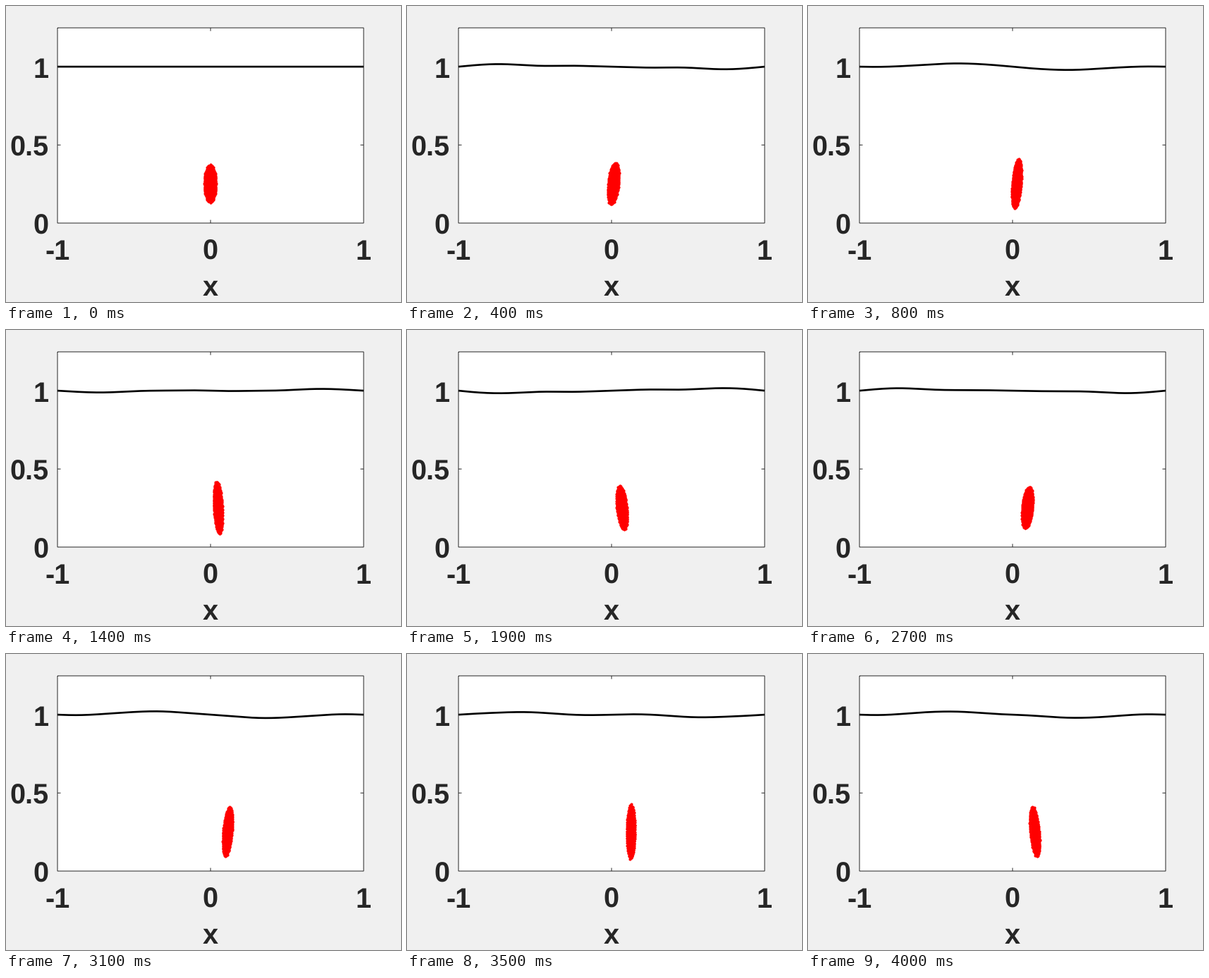
A matplotlib script for the animation above (4100 ms loop, 560 by 420 pixels).

```python
import numpy as np
import matplotlib.pyplot as plt
from matplotlib.animation import FuncAnimation

W, H, DPI = 560, 420, 100
FRAMES, INTERVAL = 41, 100
PX = 72 / DPI                    # points per pixel
LEFT, RIGHT, TOP, BOTTOM = 73, 507, 31, 308
MID = (LEFT + RIGHT) / 2
INK = "#262626"
plt.rcParams["text.hinting"] = "none"


def to_x(x):
    return MID + x * (RIGHT - LEFT) / 2


def to_y(y):
    return BOTTOM - y * (BOTTOM - TOP) / 1.25


fig = plt.figure(figsize=(W / DPI, H / DPI), dpi=DPI, facecolor="#f0f0f0")
ax = fig.add_axes([0, 0, 1, 1])
ax.set_xlim(0, W)
ax.set_ylim(H, 0)
ax.axis("off")


def stroke(xs, ys):
    ax.plot(xs, ys, color=INK, lw=PX, snap=False,
            solid_capstyle="butt", solid_joinstyle="miter", zorder=2)


def label(x, baseline, text):
    ax.text(x, baseline, text, fontsize=39.6 * PX, family="Liberation Sans",
            weight="bold", color=INK, ha="left", va="baseline")


# Plot box, ticks and labels
ax.fill([LEFT, RIGHT, RIGHT, LEFT], [TOP, TOP, BOTTOM, BOTTOM],
        color="white", lw=0, zorder=1)
stroke([LEFT, RIGHT, RIGHT, LEFT, LEFT], [TOP, TOP, BOTTOM, BOTTOM, TOP])
TICK = 4.5
stroke([MID, MID], [TOP, TOP + TICK])
stroke([MID, MID], [BOTTOM, BOTTOM - TICK])
for level in (0.5, 1):
    y = to_y(level)
    stroke([LEFT, LEFT + TICK], [y, y])
    stroke([RIGHT, RIGHT - TICK], [y, y])

label(38.4, 102, "1")
label(5.6, 213, "0.5")
label(38.4, 324, "0")
label(55.2, 360, "-1")
label(278.4, 360, "0")
label(495.4, 360, "1")
label(278.6, 411, "x")

# Free surface: standing modes excited by a vortex at a quarter of the depth
STEP = np.pi / 2
K = np.arange(1, 7)
OMEGA = np.sqrt(K * np.tanh(K))
AMP = 0.083 * np.sinh(K / 4) / np.cosh(K) / OMEGA
grid_x = np.linspace(-1, 1, 300)
MODES = np.sin(np.pi * np.outer(grid_x, K))

# Vortex patch: tracer points on a grid inside the unit disc
u, v = np.meshgrid(np.linspace(-1, 1, 25), np.linspace(-1, 1, 25))
inside = u**2 + v**2 <= 1.0001
u, v = u[inside], v[inside]
PERIOD = 23.6
AREA = 8.4 * 27.4

surface, = ax.plot([], [], color="black", lw=2.67 * PX, snap=False,
                   solid_capstyle="butt", zorder=3)
patch, = ax.plot([], [], "o", color="red", ms=4.2 * PX, mew=0, zorder=4)


def update(n):
    eta = MODES @ (AMP * np.sin(OMEGA * n * STEP))
    surface.set_data(to_x(grid_x), to_y(1 + eta) - 0.3)

    # The patch drifts, nutates and keeps its area while the tracers circulate
    phase = 2 * np.pi * n / PERIOD
    tall = 32.7 + 0.03 * n - 5.4 * np.cos(phase)
    wide = AREA / tall
    lean = 3.4 * np.sin(phase)
    p = u * np.cos(phase) - v * np.sin(phase)
    q = u * np.sin(phase) + v * np.cos(phase)
    # Markers land on pixel centres, hence the half-pixel shift
    x = to_x(0) - 0.5 + 0.797 * n + wide * p + lean * q
    y = to_y(0.25) - 0.5 - tall * q
    patch.set_data(x, y)
    return surface, patch


anim = FuncAnimation(fig, update, frames=FRAMES, interval=INTERVAL,
                     init_func=lambda: update(0), repeat=True, repeat_delay=0)
plt.show()
```
